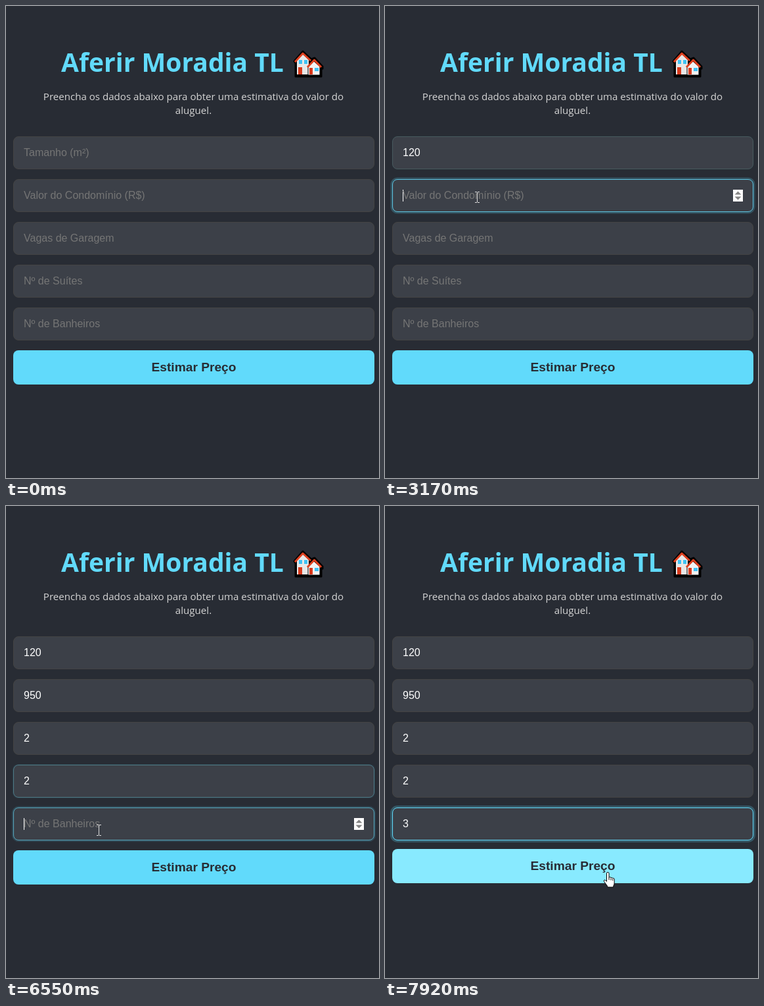
An HTML page for the animation above (7990 ms loop, 568x717 px).

```html
<!DOCTYPE html>
<html lang="pt-BR">
<head>
<meta charset="utf-8">
<title>Aferir Moradia TL</title>
<style>
  html, body { margin: 0; width: 100%; height: 100%; overflow: hidden; background: #282c34; }
  #stage { position: relative; width: 568px; height: 717px; overflow: hidden; background: #282c34; }
  svg { position: absolute; left: 0; top: 0; }
  .title { font: bold 39px "Open Sans", "Noto Sans", sans-serif; fill: #61dafb; }
  .sub { font: 15.1px "Open Sans", "Noto Sans", sans-serif; fill: #d4d4d4; text-anchor: middle; }
  .field, .button { position: absolute; left: 11px; width: 550px; box-sizing: border-box; border-radius: 8px; }
  .field {
    height: 50px; padding-left: 15px; border: 1px solid #444; background: #3c4048;
    font: 16px/48px "Liberation Sans", Arial, sans-serif; color: #fff; white-space: nowrap;
  }
  .hint { position: absolute; left: 15px; color: #757575; }
  .caret {
    display: inline-block; width: 1px; height: 18px; margin-right: -1px;
    vertical-align: -4px; background: #fff;
  }
  .spin { left: 518px; top: 15px; }
  .button {
    top: 523px; height: 52px; text-align: center; color: #282c34;
    font: bold 19.2px/52px "Liberation Sans", Arial, sans-serif;
  }
</style>
</head>
<body>
<div id="stage">
  <svg width="568" height="717">
    <text class="title" x="84" y="100">Aferir Moradia TL</text>
    <text class="sub" x="285.5" y="143">Preencha os dados abaixo para obter uma estimativa do valor do</text>
    <text class="sub" x="285.5" y="164">aluguel.</text>
    <g id="house" stroke-linejoin="round">
      <path d="M439 84L452 69 465 81 470 79 482 92V95H480V107H441V87Z" stroke="#000" stroke-width="3"/>
      <path d="M443 82L452 73 461 82V104H443Z" fill="#e8e8e8"/>
      <path d="M440 85L452 72 464 83" fill="none" stroke="#e0401f" stroke-width="3"/>
      <path d="M446 82h5v6h-5zM454 82h5v6h-5z" fill="#3fc3f5"/>
      <path d="M445 93h6v11h-6z" fill="#d8391c"/>
      <path d="M460 92L469 84 478 92V105H460Z" fill="#f2f2f2" stroke="#000"/>
      <path d="M459 93L469.5 82 480 93" fill="none" stroke="#e0401f" stroke-width="3"/>
      <path d="M462 94h5v10h-5z" fill="#d8391c"/>
      <path d="M470 94h6v5h-6z" fill="#3fc3f5"/>
    </g>
  </svg>
  <div class="button">Estimar Preço</div>
  <svg id="pointer" width="568" height="717">
    <circle cx="-2" cy="-1" r="12" fill="#ff0" fill-opacity=".5"/>
    <path id="arrow" d="M.5 .5V15.500L4 12.300 6.300 17.500 8.700 16.500 6.500 11.500H11Z" fill="#fff" stroke="#000" stroke-width=".8"/>
    <path id="beam" d="M-3-7.500H0M1-7.500H4M.5-7V8M-3 8.500H0M1 8.500H4" fill="none" stroke="#ddd"/>
    <g id="hand" transform="translate(-7 -.5)" stroke="#000" stroke-linejoin="round">
      <path d="M5.500 2.700a1.800 1.800 0 0 1 3.600 0V9a1.600 1.600 0 0 1 3 .6a1.500 1.500 0 0 1 2.700 .7a1.400 1.400 0 0 1 2.400 1V17.500c0 2-1.500 3-1.500 6H7c0-2.500-3-4.500-5.500-8.800-.8-1.600 1-2.800 2.300-1.600l1.700 1.700z" fill="#fff"/>
      <path d="M9.100 9v3.500M12.100 10v3M14.800 11v2.500" fill="none"/>
    </g>
  </svg>
</div>
<script>
const LOOP = 7990, FADE = 300, KEY_GAP = 390, BLINK = 600, IDLE = 1080, PRESS = 112;
const $ = s => document.querySelector(s);

// click: when the field takes focus; type: when its first key is pressed (ms).
const fields = [
  { hint: 'Tamanho (m²)', text: '120', click: 1050, type: 1440 },
  { hint: 'Valor do Condomínio (R$)', text: '950', click: 2985, type: 3670 },
  { hint: 'Vagas de Garagem', text: '2', click: 4925, type: 5320 },
  { hint: 'Nº de Suítes', text: '2', click: 5575, type: 5960 },
  { hint: 'Nº de Banheiros', text: '3', click: 6430, type: 6820 }
];

// The pointer glides to each stop during the given span.
const entry = { from: 65, x: 140, y: 622 };
const moves = [
  { span: [70, 510], x: 121, y: 222 },
  { span: [2300, 2950], x: 140, y: 290 },
  { span: [4530, 4750], x: 128, y: 365 },
  { span: [5340, 5470], x: 115, y: 420 },
  { span: [5900, 6040], x: 141, y: 492 },
  { span: [6820, 7140], x: 336, y: 594 },
  { span: [7220, 7480], x: 339, y: 556 }
];
const button = { enter: 6940, leave: 7070, back: 7330 };

const clamp = x => Math.min(1, Math.max(0, x));
const smooth = x => x * x * (3 - 2 * x);
const fade = (t, start) => 1 - (1 - clamp((t - start) / FADE)) ** 2;
const mix = (a, b, k) => `rgb(${a.map((v, i) => v + (b[i] - v) * k)})`;
const show = (el, on) => { el.style.visibility = on ? 'visible' : 'hidden'; };

fields.forEach((f, i) => {
  f.top = 198 + 65 * i;
  f.blur = i + 1 < fields.length ? fields[i + 1].click : Infinity;
  f.box = document.createElement('div');
  f.box.className = 'field';
  f.box.style.top = f.top + 'px';
  f.box.innerHTML = `<span class="hint">${f.hint}</span><span class="value"></span><i class="caret"></i>
    <svg class="spin" width="15" height="18"><path d="M0 0h15v18H0z" fill="#fff"/>
    <path d="M2.500 7.500L7.500 2.500 12.500 7.500ZM2.500 10.500h10L7.500 15.500Z" fill="#858585"/></svg>`;
  $('#stage').insertBefore(f.box, $('.button'));
  [f.hintEl, f.valueEl, f.caretEl, f.spinEl] = f.box.children;
});

function pointerAt(t) {
  let { x, y } = entry;
  for (const m of moves) {
    const k = smooth(clamp((t - m.span[0]) / (m.span[1] - m.span[0])));
    x += (m.x - x) * k;
    y += (m.y - y) * k;
  }
  return { x, y, shown: t >= entry.from };
}

const over = (p, f) => p.shown && p.y >= f.top && p.y < f.top + 50;

function drawField(f, t, p) {
  const count = t < f.type ? 0 : Math.min(f.text.length, 1 + Math.floor((t - f.type) / KEY_GAP));
  const idle = t - (count ? f.type + (count - 1) * KEY_GAP : f.click);
  const focused = t >= f.click && t < f.blur;
  f.valueEl.textContent = f.text.slice(0, count);
  show(f.hintEl, !count);
  show(f.caretEl, focused && idle % (2 * BLINK) < BLINK);
  show(f.spinEl, over(p, f) || focused && idle < IDLE);

  const k = fade(t, f.click) - fade(t, f.blur);
  f.box.style.borderColor = mix([68, 68, 68], [97, 218, 251], k);
  f.box.style.boxShadow = `0 0 0 ${3 * k}px rgba(97,218,251,${.25 * k})`;
}

function drawPointer(t, p) {
  const shape = fields.some(f => over(p, f)) ? 'beam' : p.y > 523 && p.y < 575 ? 'hand' : 'arrow';
  for (const id of ['arrow', 'beam', 'hand']) show($('#' + id), p.shown && id === shape);
  show($('#pointer circle'), fields.some(f => t >= f.click && t < f.click + PRESS));
  $('#pointer').style.overflow = 'visible';
  $('#pointer').style.transform = `translate(${Math.round(p.x)}px, ${Math.round(p.y)}px)`;
}

function drawButton(t) {
  const k = fade(t, button.enter) - fade(t, button.leave) + fade(t, button.back);
  const { style } = $('.button');
  style.background = mix([97, 218, 251], [136, 234, 255], k);
  style.transform = `translateY(${-2 * k}px)`;
}

function render() {
  const t = performance.now() % LOOP;
  const p = pointerAt(t);
  fields.forEach(f => drawField(f, t, p));
  drawPointer(t, p);
  drawButton(t);
  requestAnimationFrame(render);
}
render();
</script>
</body>
</html>
```
